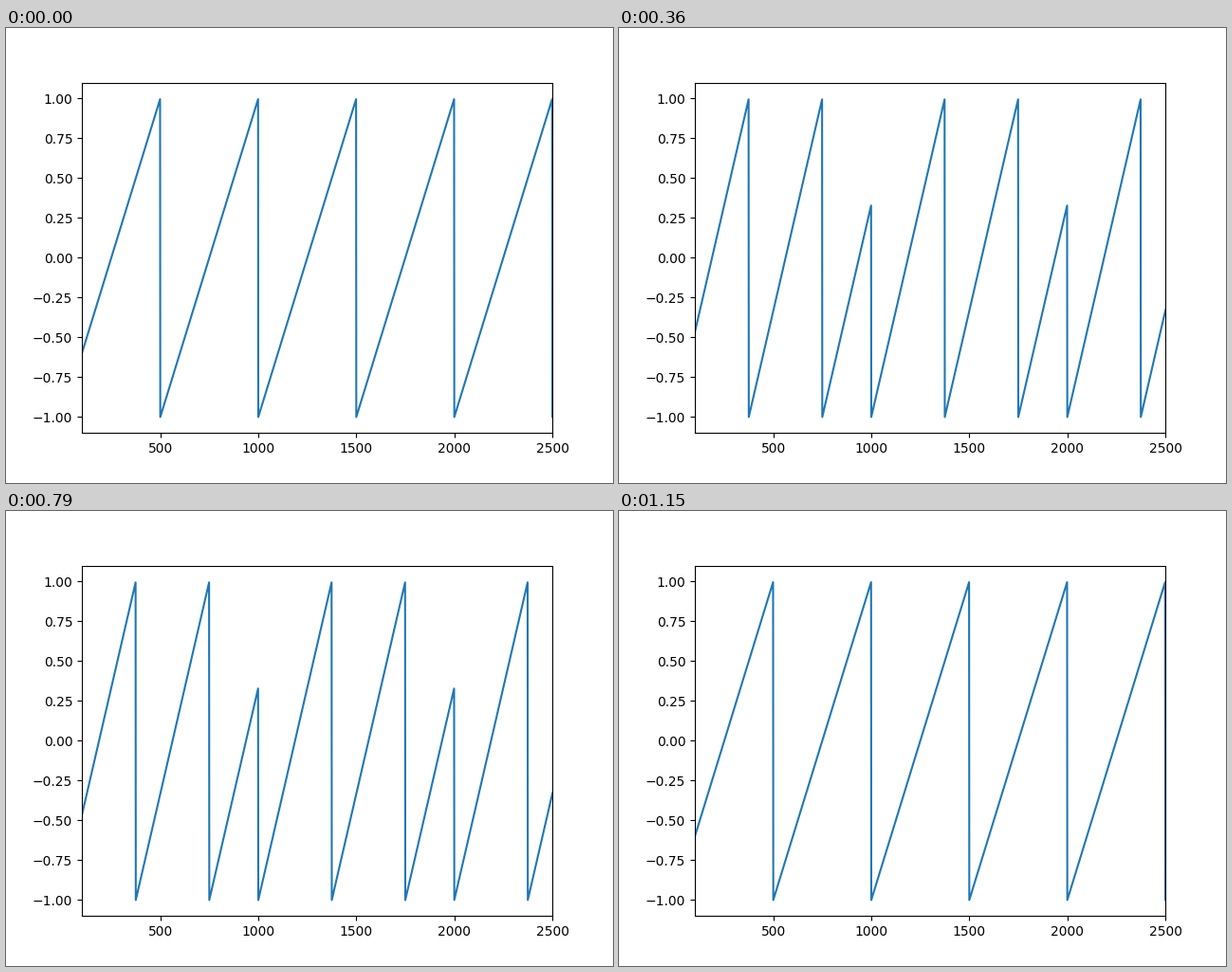
Write a matplotlib script that moves like this. It is 640 px wide and 480 px high and loops after 1210 ms.

```python
import numpy as np
import matplotlib.pyplot as plt
from matplotlib.animation import FuncAnimation

LOOP_MS = 1210
TICK_MS = 10
STEP_MS = 60
STEPS = 9
MASTER = 1000  # samples per master period

t = np.arange(3000)


def synced_saw(ratio):
    """Sawtooth at `ratio` times the master rate, reset every master period."""
    phase = (t % MASTER) * ratio / MASTER + 1e-9
    return 2 * (phase % 1) - 1


def ratio_at(ms):
    """Climb from 2 to 3 in equal steps, hold, then step back down."""
    rising = ms // STEP_MS
    falling = (LOOP_MS - 1 - ms) // STEP_MS
    return 2 + min(rising, falling, STEPS) / STEPS


fig, ax = plt.subplots(figsize=(6.4, 4.8), dpi=100)
ax.set_xlim(100, 2500)
ax.set_ylim(-1.1, 1.1)
line, = ax.plot(t, synced_saw(2), color="#1f77b4", lw=1.5)


def update(i):
    line.set_ydata(synced_saw(ratio_at(i * TICK_MS)))
    return line,


anim = FuncAnimation(fig, update, frames=LOOP_MS // TICK_MS,
                     interval=TICK_MS, repeat=True, repeat_delay=0)
plt.show()
```
